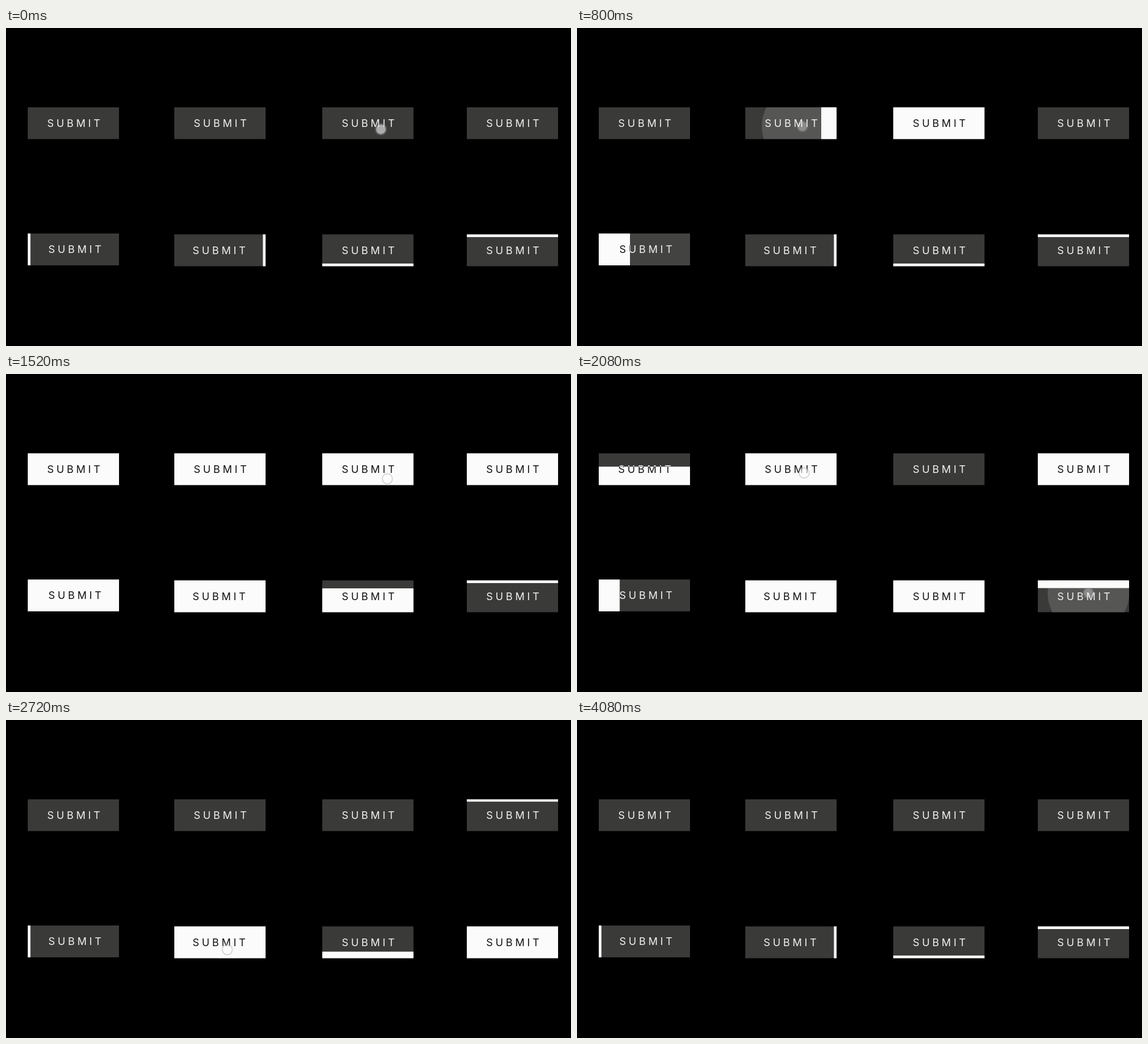
Recreate the animation shown at these times as an HTML page with a canvas. Size 960 by 540 pixels, loop 4720 ms.

```html
<!DOCTYPE html>
<html lang="en">
<head>
<meta charset="utf-8">
<title>Submit buttons</title>
<style>
  html, body { margin: 0; width: 100%; height: 100%; overflow: hidden; background: #000; }
  canvas { display: block; }
</style>
</head>
<body>
<canvas id="stage" width="960" height="540"></canvas>
<script>
const ctx = document.getElementById('stage').getContext('2d');
const LOOP = 4720, STEP = 80, FILL = 480, LEAD = 60;
const W = 155.4, H = 54.4, SPACING = 4.5, BAR = 4.9;

// side: edge the white grows from; taps: [fill start, x, y] for on and off
const buttons = [
  { x: 36.8, y: 134.4, side: 'bottom', taps: [[900, 125, 170], [1863, 124, 171]] },
  { x: 285.8, y: 134.4, side: 'right', taps: [[663, 383, 167], [2140, 386, 168]] },
  { x: 537.2, y: 134.4, side: 'left', taps: [[60, 637, 172], [1580, 648, 178]] },
  { x: 782.8, y: 134.4, side: 'top', taps: [[1050, 878, 170], [2336, 876, 172]] },
  { x: 36.8, y: 348.8, side: 'left', bar: BAR, shift: 2, taps: [[611, 119, 372], [1751, 118, 378]] },
  { x: 285.8, y: 350.3, side: 'right', bar: BAR, shift: -2, taps: [[980, 374, 386], [2720, 376, 390]] },
  { x: 537.2, y: 350.3, side: 'bottom', bar: BAR, taps: [[1215, 640, 385], [2362, 642, 386]] },
  { x: 782.8, y: 350.3, side: 'top', bar: BAR, taps: [[1942, 869, 372], [3063, 868, 389]] }
];

const clamp = v => Math.max(0, Math.min(1, v));

// cubic-bezier(.42, 0, .58, 1)
function easeInOut(t) {
  let lo = 0, hi = 1;
  for (let i = 0; i < 20; i++) {
    const s = (lo + hi) / 2, r = 1 - s;
    if (1.26 * s * r * r + 1.74 * s * s * r + s ** 3 < t) lo = s; else hi = s;
  }
  return lo * lo * (3 - 2 * lo);
}

const progress = (t, start) => t <= start ? 0 : t >= start + FILL ? 1 : easeInOut((t - start) / FILL);

function whiteRect(b, t) {
  const [on, off] = b.taps.map(tap => progress(t, tap[0]));
  const bar = b.bar || 0;
  const size = full => bar + (full - bar) * (on - off);
  const w = size(W), h = size(H);
  switch (b.side) {
    case 'left': return [b.x, b.y, w, H];
    case 'right': return [b.x + W - w, b.y, w, H];
    case 'top': return [b.x, b.y, W, h];
    default: return [b.x, b.y + H - h, W, h];
  }
}

function clipTo(rect, draw) {
  ctx.save();
  ctx.beginPath();
  ctx.rect(...rect);
  ctx.clip();
  draw();
  ctx.restore();
}

function disc(x, y, r) {
  ctx.beginPath();
  ctx.arc(x, y, r, 0, 2 * Math.PI);
}

function label(b, color) {
  ctx.fillStyle = color;
  ctx.fillText('SUBMIT', b.x + W / 2 + 0.5 + SPACING / 2 + (b.shift || 0), b.y + 33.4);
}

function ripple([start, x, y], t) {
  const age = t - start;
  if (age < -LEAD || age > 210) return;
  ctx.fillStyle = `rgba(255,255,255,${0.14 * clamp((210 - age) / 65)})`;
  disc(x, y, 0.35 * (age + LEAD));
  ctx.fill();
}

function pointer([start, x, y], t) {
  const age = t - start;
  if (age < -LEAD || age > 165) return;
  ctx.globalAlpha = clamp((165 - age) / 55);
  const glow = ctx.createRadialGradient(x, y, 6, x, y, 12);
  glow.addColorStop(0, 'rgba(255,255,255,.2)');
  glow.addColorStop(1, 'rgba(255,255,255,0)');
  ctx.fillStyle = glow;
  disc(x, y, 12);
  ctx.fill();
  ctx.fillStyle = 'rgba(255,255,255,.48)';
  disc(x, y, 8);
  ctx.fill();
  ctx.strokeStyle = 'rgba(150,150,150,.4)';
  ctx.lineWidth = 1.6;
  disc(x, y, 8.6);
  ctx.stroke();
  ctx.globalAlpha = 1;
}

function drawButton(b, t) {
  clipTo([b.x, b.y, W, H], () => {
    ctx.fillStyle = '#3a3a39';
    ctx.fillRect(b.x, b.y, W, H);
    b.taps.forEach(tap => ripple(tap, t));
    label(b, '#f2f2f2');
  });
  const white = whiteRect(b, t);
  clipTo(white, () => {
    ctx.fillStyle = '#fbfbfb';
    ctx.fillRect(...white);
    label(b, '#111');
  });
}

function frame(now) {
  const t = Math.floor(now % LOOP / STEP) * STEP;
  ctx.fillStyle = '#000';
  ctx.fillRect(0, 0, 960, 540);
  ctx.font = '17.5px Inter, sans-serif';
  ctx.letterSpacing = SPACING + 'px';
  ctx.textAlign = 'center';
  buttons.forEach(b => drawButton(b, t));
  buttons.forEach(b => b.taps.forEach(tap => pointer(tap, t)));
  requestAnimationFrame(loop);
}

const begin = performance.now();
const loop = () => frame(performance.now() - begin);
loop();
</script>
</body>
</html>
```
